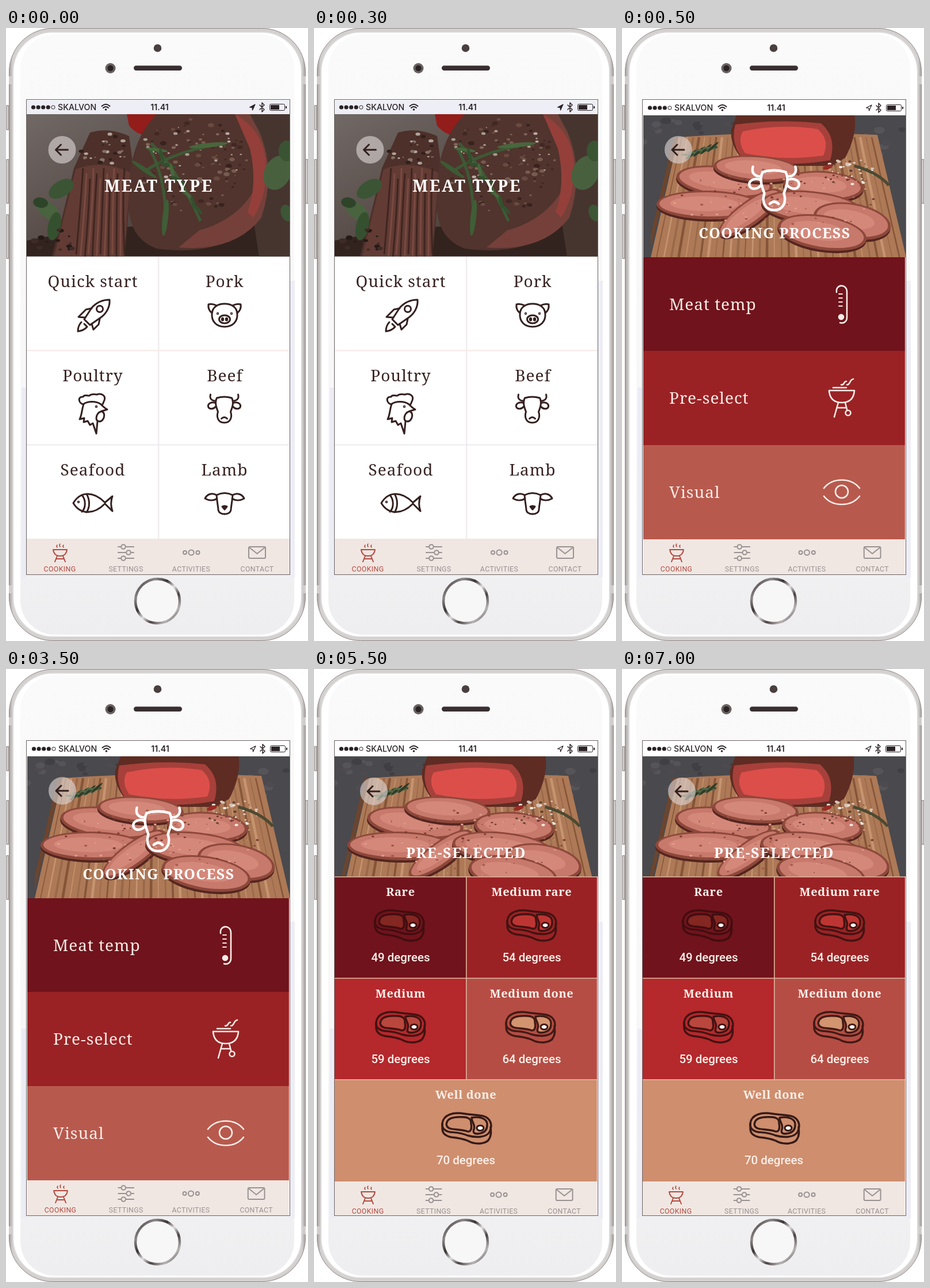
These frames come from a looping animation (525x1067 px, 8 s). An HTML page:

```html
<!DOCTYPE html>
<html lang="en">
<head>
<meta charset="utf-8">
<title>Grill app</title>
<style>
html, body { margin: 0; width: 100%; height: 100%; overflow: hidden; background: #fff; }
svg { display: block; width: 100vw; height: 100vh; }
.line { fill: none; stroke-linecap: round; stroke-linejoin: round; }
.ink { stroke: #33201f; stroke-width: 3; }
.cream { stroke: #f8ece6; stroke-width: 2.6; }
.slab { font-family: "Noto Serif", serif; font-size: 28px; letter-spacing: 1px; }
.title { font: bold 25px "Noto Serif", serif; fill: #fff; text-anchor: middle; letter-spacing: 1.3px; }
.name { font: bold 20px "Noto Serif", serif; fill: #fbf0ea; text-anchor: middle; letter-spacing: .65px; }
.temp { font: 500 20.5px Roboto, sans-serif; fill: #fbf0ea; text-anchor: middle; }
.tab { font: 12.4px Roboto, sans-serif; text-anchor: middle; letter-spacing: .35px; }
.bar { font: 500 14.2px Inter, sans-serif; fill: #2a2225; }
</style>
</head>
<body>
<svg id="stage" viewBox="0 0 525 1067" preserveAspectRatio="none" xmlns="http://www.w3.org/2000/svg"></svg>
<script>
const LOOP = 8000;
const CUTS = [0, 500, 5500, LOOP];

const path = (d, attrs = '') => `<path d="${d}" ${attrs}/>`;
const fill = (d, color) => path(d, `fill="${color}"`);
const rect = (x, y, w, h, color, more = '') =>
  `<rect x="${x}" y="${y}" width="${w}" height="${h}" fill="${color}" ${more}/>`;
const dot = (x, y, r, more = '') => `<circle cx="${x}" cy="${y}" r="${r}" ${more}/>`;
const oval = (x, y, rx, ry, more = '') => `<ellipse cx="${x}" cy="${y}" rx="${rx}" ry="${ry}" ${more}/>`;
const text = (cls, x, y, str, more = '') => `<text class="${cls}" x="${x}" y="${y}" ${more}>${str}</text>`;
const group = (attrs, ...parts) => `<g ${attrs}>${parts.join('')}</g>`;
const line = (cls, ...parts) => group(`class="line ${cls}"`, ...parts);
const mirror = (x, part) => part + group(`transform="matrix(-1 0 0 1 ${2 * x} 0)"`, part);

function random(seed) {
  return () => (seed = (seed * 16807) % 2147483647) / 2147483647;
}

// Scatters small flakes inside an ellipse.
function flakes(seed, count, cx, cy, rx, ry, size, colors) {
  const rnd = random(seed);
  let out = '';
  for (let i = 0; i < count; i++) {
    const a = rnd() * 6.283, d = Math.sqrt(rnd());
    const x = cx + Math.cos(a) * d * rx, y = cy + Math.sin(a) * d * ry, s = size * (.4 + rnd());
    out += oval(x.toFixed(1), y.toFixed(1), s.toFixed(1), (s * .65).toFixed(1),
      `fill="${colors[i % colors.length]}"`);
  }
  return out;
}

/* ---------- icons ---------- */

const rocket = path('M180 473C168 473 157 478 149 487L136 507 146 517 166 503C175 496 181 485 180 473Z') +
  dot(163, 489, 5.5) +
  path('M149 488 139 490 126 503 138 504M163 506 161 516 152 525 149 515M131 512C127 516 125 521 125 528 132 527 137 525 141 520L136 515');

const pig = path('M358 497C359 485 369 480 380 480S401 485 402 497C403 511 394 520 380 520S357 511 358 497Z') +
  mirror(380, path('M366 483C362 481 357 480 352 481 351 488 354 493 358 496') +
    oval(376.5, 507, 1.2, 2) + dot(368, 497, .7)) +
  oval(380, 507, 9.5, 7);

const rooster = path('M134 655C126 653 124 641 134 642 136 637 143 641 145 640 149 636 155 638 158 638 166 635 174 640 171 648 169 651 170 653 167 656') +
  path('M134 655C142 649 157 649 165 655 168 658 170 661 176 664L166 667C173 670 171 678 168 682 164 687 157 685 157 679 157 674 160 669 166 667') +
  path('M135 655C132 662 132 674 128 681L136 679 135 686 142 684 146 691 151 688 157 706 159 685') +
  dot(157, 659, .8);

const cow = path('M-13-19Q0-23 13-19C17-11 14-3 11 5 14 14 11 24 0 24S-14 14-11 5C-14-3-17-11-13-19Z') +
  mirror(0, path('M-15-14C-22-14-26-18-24-25M-15-10C-21-13-29-10-28-4-26 2-18 0-15-4')) +
  path('M-5 17Q0 12 5 17');

const fish = path('M117 827C129 806 152 806 172 826L185 815C182 823 182 832 185 841L172 828C152 848 129 847 117 827Z') +
  path('M132 813C139 821 139 835 132 842M140 811C146 821 146 834 140 843') + dot(126, 825, .8);

const lamb = path('M366 813Q380 806 394 813') +
  mirror(380, path('M366 813C358 808 349 812 346 819 353 823 361 823 367 819M366 813C367 826 369 834 369 839 370 844 374 846 380 846')) +
  path('M376 833 380 838 384 833 380 832Z', 'fill="#33201f"');

const thermometer = path('M373 460C371 445 391 445 391 459V504C391 511 385 515 379 513') +
  path('M377 463H383M377 470H383M377 477H383M377 484H383', 'stroke-width="1.8"') +
  dot(381, 503, 4, 'fill="#f8ece6"');

const grill = path('M360 631H404C403 645 395 652 382 652S361 645 360 631ZM367 626H390') +
  path('M376 652 369 677M388 652 391 664M374 661H390') + dot(393, 670, 4.5) +
  path('M381 621C387 622 385 615 390 615M391 621C397 622 395 612 402 611');

const eye = path('M351 801C366 782 398 782 413 801M351 815C366 834 398 834 413 815') + dot(382, 807, 11);

const steak = (x, y, meat, ink) => group(
  `class="line" stroke="${ink}" stroke-width="3.4" transform="translate(${x} ${y})"`,
  path('M-42-8C-40-24-22-28-4-25 12-22 24-24 34-19 44-13 45-2 40 7 34 17 16 17 2 13-10 8-18 8-28 7-38 5-43 0-42-8Z'),
  path('M-42-8V1C-42 9-36 14-26 16-16 17-8 18 2 22 16 30 36 28 40 18 43 13 43 8 42-2'),
  path('M-34-10C-31-19-18-20-4-19 8-18 8-12 8-8 10 2 7 7 2 6-8 2-22 3-28 1-34-1-36-5-34-10Z', `fill="${meat}"`),
  path('M9-18C24-21 37-16 36-5 36 4 30 9 20 10 13 10 11 8 13 2 16-6 9-10 9-18Z', `fill="${meat}"`),
  oval(24, 0, 6, 4.5, 'fill="#fff" stroke-width="3"'));

const back = (x, y) => dot(x, y, 24, 'fill="#dcd6d3" fill-opacity=".62"') +
  group(`class="line ink" transform="translate(${x} ${y})"`, path('M10 0H-10M-2-9-11 0-2 9'));

/* ---------- photos ---------- */

const leaf = (x, y, w, h, turn, color) => oval(0, 0, w, h,
  `fill="${color}" transform="translate(${x} ${y}) rotate(${turn})"`);

function steakPhoto() {
  let sprig = '';
  for (let i = 0; i < 9; i++) {
    sprig += leaf(262 + i * 9, 212 + i * 13, 19 - i, 3, i % 2 ? 78 : 8 + i * 5, i % 3 ? '#33502e' : '#48663c');
  }
  let fibres = '';
  for (let i = 0; i < 13; i++) {
    fibres += path(`M${134 + i * 6} ${244 + (i % 3) * 9}q${-4 + i % 4} 60 ${-12 + i} 150`,
      `stroke="${i % 2 ? '#7a4a40' : '#402520'}" stroke-width="3" fill="none"`);
  }
  return rect(36, 150, 458, 248, 'url(#stone)') +
    fill('M36 370 140 350 494 330V398H36Z', '#33231f') +
    fill('M210 150H288L270 184Q236 196 214 170Z', '#921d1b') +
    fill('M402 150H494V398H440Z', '#46352f') +
    fill('M146 182Q178 172 214 188L221 240 206 397H80Q98 330 118 244Z', '#4d302a') +
    fill('M121 246Q166 228 217 252L205 397H84Z', '#613b34') + fibres +
    fill('M262 150H402Q448 180 452 240 462 300 430 344 370 398 262 384 208 364 214 292 212 200 262 150Z', '#50342d') +
    fill('M398 150Q442 182 446 238C440 290 398 336 336 352L300 382Q398 390 444 330 470 250 440 180L424 150Z', '#75403a') +
    fill('M398 150Q450 180 452 240 454 290 430 330L420 320Q438 270 424 210Z', '#943f3a') +
    flakes(41, 80, 326, 240, 98, 82, 4, ['#38221e', '#694a40', '#422822', '#765b50']) +
    flakes(7, 42, 320, 220, 92, 58, 2.8, ['#a89a90', '#81675c', '#b9aba3']) +
    flakes(19, 32, 172, 214, 42, 30, 3.2, ['#857066', '#32201c', '#b0a39b']) +
    path('M252 200Q300 250 338 336M240 250Q294 214 372 202M250 210Q282 270 276 352', 'stroke="#3d5935" stroke-width="5" fill="none"') +
    sprig + leaf(240, 246, 26, 4, 35, '#3c5a34') + leaf(352, 204, 34, 4, -6, '#48663c') +
    leaf(277, 330, 5, 32, 6, '#3f5d37') +
    leaf(96, 280, 24, 14, -32, '#3b5534') + leaf(74, 318, 23, 13, 38, '#49633f') +
    leaf(84, 345, 11, 25, 12, '#35502f') + leaf(60, 304, 13, 9, 10, '#2e4429') +
    leaf(472, 252, 23, 31, 25, '#49603f') + leaf(488, 214, 14, 18, 0, '#3a5333') +
    leaf(488, 322, 10, 15, -20, '#3d5635') +
    flakes(23, 14, 84, 370, 38, 26, 5, ['#251a18', '#3d2b26']);
}

const slice = (x, y, w, h, turn) => group(`transform="translate(${x} ${y}) rotate(${turn})"`,
  oval(0, 4, w, h, 'fill="#54251e"'), oval(0, 0, w, h, 'fill="#8d483b"'),
  oval(0, -1, w - 5, h - 4, 'fill="#c7796b"'), oval(-w * .08, -2, w * .66, h * .52, 'fill="#d4887a"'));

function roastPhoto() {
  let grain = '';
  for (let i = 0; i < 34; i++) {
    grain += path(`M${104 + i * 10} 190L${60 + i * 12.8} 399`,
      `stroke="${['#855539', '#c69470', '#99684a'][i % 3]}" stroke-width="${1.5 + i % 4}"`);
  }
  let rosemary = path('M112 228Q132 212 166 207', 'stroke="#39482f" stroke-width="3" fill="none"');
  for (let i = 0; i < 8; i++) {
    rosemary += leaf(116 + i * 6, 221 - i * 2, 13, 2.2, i % 2 ? -42 : 3, i % 2 ? '#2d3d28' : '#526747');
  }
  return rect(34, 150, 462, 250, '#4a494d') +
    flakes(3, 100, 264, 190, 236, 50, 7, ['#403f44', '#555459', '#4d4b50']) +
    fill('M98 190Q270 178 444 186L494 399H50Z', '#ad7956') + grain +
    fill('M50 384 98 190 90 190 50 360Z', '#6b452f') +
    fill('M200 150H404Q410 184 388 226L364 240H220Q186 208 190 176Z', '#5e2c23') +
    fill('M197 168Q270 158 346 166 374 190 362 230 284 244 210 228 188 200 197 168Z', '#a7403a') +
    fill('M210 180Q276 166 340 176 362 194 350 222 280 232 214 218 200 198 210 180Z', '#dc4e4a') +
    slice(178, 268, 84, 27, 7) + slice(234, 245, 75, 23, 4) + slice(350, 275, 70, 26, 4) +
    slice(150, 308, 90, 25, 1) + slice(222, 322, 66, 21, -36) +
    slice(330, 312, 88, 28, 6) + slice(400, 336, 68, 31, 10) + slice(348, 356, 78, 30, 9) +
    flakes(77, 110, 272, 302, 182, 58, 2, ['#a35749', '#e09b8c', '#783a30']) +
    flakes(13, 44, 394, 250, 44, 24, 2.4, ['#f1e9e2', '#d8c5b8', '#5c3b2d']) +
    path('M404 240Q446 252 464 274', 'stroke="#4c4a32" stroke-width="5" fill="none"') +
    leaf(358, 242, 9, 4, -20, '#9a2b26') + rosemary;
}

/* ---------- shared chrome ---------- */

function statusBar(solid) {
  let dots = '';
  for (let i = 0; i < 4; i++) dots += dot(47.5 + i * 8.6, 138, 3.6, 'fill="#2a2225"');
  return dots + dot(82, 138, 3.1, 'fill="none" stroke="#2a2225"') +
    text('bar', 90, 143, 'SKALVON') +
    text('bar', 267, 143, '11.41', 'text-anchor="middle" style="font-weight:600"') +
    group('class="line" stroke="#2a2225" stroke-width="2"',
      path('M166.500 136Q173.500 129.500 180.500 136M169 139Q173.500 135 178 139'),
      dot(173.5, 142, .8),
      path('M433 133 423.500 138 428 138.500 428.500 143Z', `stroke-width="1.200" fill="${solid ? '#2a2225' : 'none'}"`),
      path('M441 134 449 142 445 146V130L449 134 441 142', 'stroke-width="1.500"')) +
    rect(458.5, 132.5, 26, 11, 'none', 'rx="2" stroke="#2a2225"') +
    rect(460, 134, 15, 8, '#2a2225') + rect(486, 136, 2, 4, '#2a2225');
}

function tabs() {
  const knobs = [[204, 903], [213, 913], [204, 923]];
  const red = '#b44a40', grey = '#989292';
  return group(`class="line" stroke="${red}" stroke-width="2"`,
      path('M82 908H106C105 916 100 919 94 919S83 916 82 908ZM89 919 85 929M99 919 103 929M87 924H101'),
      path('M89 904Q87 902 89 900M94 903Q92 900 94 898M100 904Q98 902 100 900', 'stroke-width="1.600"')) +
    group(`class="line" stroke="${grey}" stroke-width="2"`,
      ...knobs.map(([x, y]) => path(`M195 ${y}H${x - 4}M${x + 4} ${y}H222`) + dot(x, y, 3.8)),
      dot(311, 913, 3), dot(322, 913, 4.6), dot(333.5, 913, 3),
      rect(422, 903, 29, 20, 'none', 'rx="2"'), path('M424 905 436.500 915 449 905')) +
    [['COOKING', 93.5], ['SETTINGS', 208.5], ['ACTIVITIES', 322], ['CONTACT', 436.5]]
      .map(([s, x], i) => text('tab', x, 946, s, `fill="${i ? grey : red}"`)).join('');
}

function phone() {
  const pill = (x, y, h) => rect(x, y, 6, h, '#aaa5a3', 'rx="2"') + rect(x + 1.5, y + 2, 2, h - 4, '#d9d6d5');
  const bands = [84, 970].map(y => rect(5, y, 7, 14, '#d0cdcc') + rect(514, y, 7, 14, '#d0cdcc')).join('');
  return pill(0, 134, 44) + pill(0, 228, 78) + pill(0, 324, 78) + pill(520, 228, 78) +
    rect(5.5, .5, 515, 1066, 'url(#metal)', 'rx="76" stroke="#8d8583"') + bands +
    rect(11, 6, 504, 1055, '#dad8d8', 'rx="70"') +
    rect(13, 8, 500, 1051, '#fff', 'rx="68"') +
    rect(25, 11, 476, 1045, 'url(#face)', 'rx="60"') +
    rect(27, 626, 9, 330, '#ececf5') + rect(494, 440, 8, 516, '#ededf5') +
    dot(263.5, 35, 6.8, 'fill="#4a3f3f"') +
    dot(181.5, 70, 9, 'fill="#6a6262"') + dot(181.5, 70, 5.2, 'fill="#2b2425"') +
    rect(222, 65.5, 84, 8.5, '#392f30', 'rx="4.2"') +
    dot(263.5, 997.5, 38.5, 'fill="#f7f7f7" stroke="url(#ring)" stroke-width="4.500"') +
    rect(35.5, 124.5, 458, 827, '#fff', 'stroke="#6b6464"');
}

/* ---------- screens ---------- */

function meatTypes() {
  const cells = [
    ['Quick start', 151, 451, rocket], ['Pork', 380, 451, pig],
    ['Poultry', 151, 615, rooster], ['Beef', 380.5, 615, group('transform="translate(379.500 663)"', cow)],
    ['Seafood', 151, 779, fish], ['Lamb', 380, 779, lamb]];
  return rect(36, 126, 457, 24, '#eeeef6') + statusBar(true) +
    group('clip-path="url(#tall)"', steakPhoto()) + back(97.5, 212) +
    text('title', 266, 285, 'MEAT TYPE', 'style="font-size:28.500px;letter-spacing:2.600px"') +
    rect(36, 398, 457, 491, '#fff') +
    rect(264, 398, 2.5, 491, '#f1ecee') + rect(36, 560, 457, 2.5, '#f8ece9') + rect(36, 724.5, 457, 2, '#ebebf0') +
    cells.map(([s, x, y, icon]) => text('slab', x, y, s, 'text-anchor="middle" fill="#382423"') + line('ink', icon)).join('') +
    rect(36, 889, 457, 62, '#f0e6e2') + tabs();
}

function cookingProcess() {
  const rows = [['Meat temp', 399, 163, '#70131c', thermometer],
    ['Pre-select', 562, 164, '#9a2225', grill], ['Visual', 726, 164, '#b8594d', eye]];
  return rect(36, 126, 457, 26, '#fff') + group('transform="translate(1 1)"', statusBar(false)) +
    group('clip-path="url(#mid)"', roastPhoto()) + back(98, 212) +
    group('class="line" stroke="#fff" stroke-width="2.900" transform="translate(264.500 280) scale(1.540)"', cow) +
    text('title', 265.5, 366, 'COOKING PROCESS') +
    rows.map(([s, y, h, color, icon]) => rect(37, y, 455, h, color) +
      text('slab', 82, y + 92, s, 'fill="#f8ece6"') + line('cream', icon)).join('') +
    rect(37, 890, 455, 61, '#f1e7e2') + group('transform="matrix(.993 0 0 1 1.700 0)"', tabs());
}

function preSelected() {
  const cells = [
    ['Rare', 49, 36, 362, 229, '#70131c', 148, '#842621', '#420d10'],
    ['Medium rare', 54, 265, 362, 227, '#9a2225', 378, '#bd3533', '#421311'],
    ['Medium', 59, 36, 539, 229, '#b5282c', 150, '#b9473e', '#421311'],
    ['Medium done', 64, 265, 539, 227, '#b54d44', 376, '#d39470', '#421a15'],
    ['Well done', 70, 36, 715, 456, '#cf8e6e', 265, '#cf8e6e', '#351a16']];
  return rect(36, 126, 457, 26, '#fff') + group('transform="translate(0 1)"', statusBar(false)) +
    group('clip-path="url(#short)"', group('transform="translate(-2 0)"', roastPhoto())) + back(104, 213) +
    text('title', 264.5, 329, 'PRE-SELECTED', 'style="letter-spacing:1.600px"') +
    cells.map(([s, t, x, y, w, color, ix, meat, ink]) => {
      const mid = x + w / 2;
      return rect(x, y, w, 177, color) + text('name', mid, y + 33, s) +
        steak(ix, y + 84, meat, ink) + text('temp', mid, y + 147, t + ' degrees');
    }).join('') +
    [361, 537.5, 714].map(y => rect(36, y, 456, 1.6, '#deb59f')).join('') + rect(264, 361, 1.6, 354, '#deb59f') +
    rect(36, 892, 456, 59, '#f1e7e2') + group('transform="matrix(.996 0 0 1 .400 2)"', tabs());
}

const gradient = (id, dir, stops) => `<linearGradient id="${id}" ${dir}>` +
  stops.map(([at, color]) => `<stop offset="${at}" stop-color="${color}"/>`).join('') + '</linearGradient>';
const clip = (id, x, y, w, h) => `<clipPath id="${id}">${rect(x, y, w, h, '#000')}</clipPath>`;
const down = 'x1="0" y1="0" x2="0" y2="1"', across = 'x1="0" y1="0" x2="1" y2="1"';

const defs = '<defs>' +
  gradient('metal', 'x1="0" x2="1"', [[0, '#a9a3a1'], [.012, '#d3d0cf'], [.988, '#d3d0cf'], [1, '#a9a3a1']]) +
  gradient('face', down, [[0, '#fafafa'], [.6, '#f7f7f8'], [1, '#eeeef0']]) +
  gradient('ring', across, [[0, '#2e2627'], [.22, '#8d8787'], [.38, '#3a3233'], [.52, '#e4e2e2'], [.66, '#4a4142'], [.82, '#b9b5b5'], [1, '#2e2627']]) +
  gradient('stone', across, [[0, '#716966'], [.4, '#5c514d'], [1, '#3a2c28']]) +
  clip('tall', 36, 150, 457, 247.5) + clip('mid', 37, 152, 456, 247) + clip('short', 36, 152, 457, 209) +
  '</defs>';

const stage = document.getElementById('stage');
stage.innerHTML = defs + phone() +
  [meatTypes, cookingProcess, preSelected].map(draw => group('class="screen"', draw())).join('');

// Each screen is shown between two neighbouring cuts.
document.querySelectorAll('.screen').forEach((el, i) => {
  const step = (opacity, ms) => ({ opacity, offset: ms / LOOP, easing: 'step-end' });
  const steps = [step(1, CUTS[i]), step(0, CUTS[i + 1])];
  if (i > 0) steps.unshift(step(0, 0));
  if (CUTS[i + 1] < LOOP) steps.push(step(0, LOOP));
  el.animate(steps, { duration: LOOP, iterations: Infinity });
});
</script>
</body>
</html>
```
